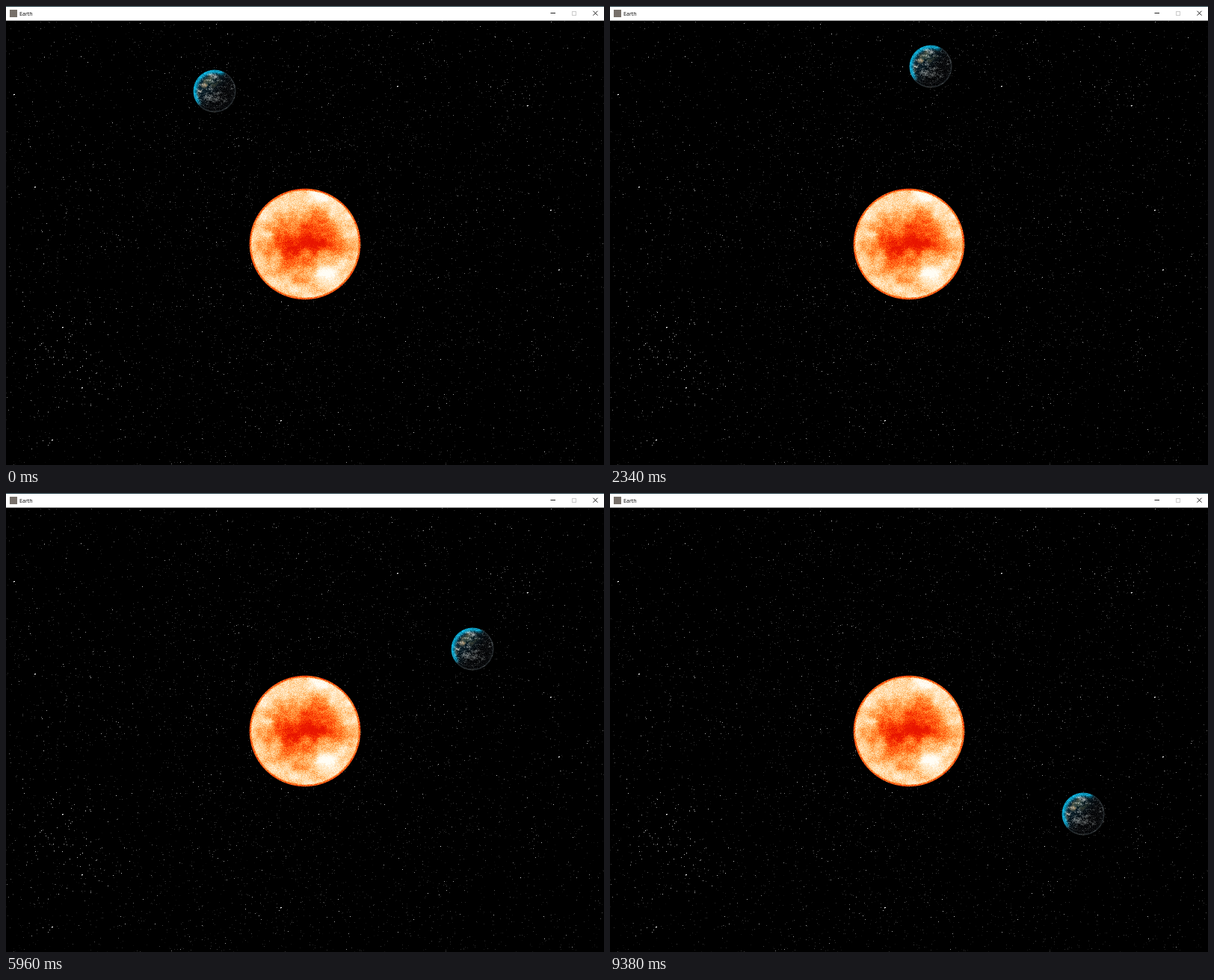
An HTML page with a canvas for the animation above (9400 ms loop, 800 px wide and 615 px high).

```html
<!DOCTYPE html>
<html lang="en">
<head>
<meta charset="utf-8">
<title>Earth</title>
<style>
  html, body { margin: 0; width: 100%; height: 100%; overflow: hidden; background: #000; }
  #stage { position: relative; width: 800px; height: 615px; overflow: hidden; background: #000; }
  canvas { position: absolute; left: 0; top: 0; }
  #bar { position: absolute; left: 0; top: 0; width: 800px; height: 20px; box-sizing: border-box;
         background: #fff; border-top: 1px solid #1c3640; border-bottom: 1px solid #999; }
  #icon { position: absolute; left: 5px; top: 4px; width: 10px; height: 10px; background: #77706a; }
  #name { position: absolute; left: 18px; top: 4px; font: 7.1px/10px "Open Sans", "Noto Sans", sans-serif; color: #000; }
  #bar svg { position: absolute; left: 0; top: -1px; }
</style>
</head>
<body>
<div id="stage">
  <canvas id="sky" width="800" height="615"></canvas>
  <canvas id="sun" width="152" height="152"></canvas>
  <canvas id="earth" width="60" height="60"></canvas>
  <div id="bar">
    <div id="icon"></div>
    <div id="name">Earth</div>
    <svg width="800" height="20" fill="none">
      <path d="M728.5 9.5h6.5" stroke="#222"/>
      <rect x="757.5" y="7.5" width="5" height="5" stroke="#ccc"/>
      <path d="M785.5 6.7l6 6m0-6l-6 6" stroke="#222"/>
    </svg>
  </div>
</div>
<script>
const LOOP = 9400, STEP = 20;
const ORBIT = { x: 405, y: 329.3, r: 249.4, from: -120.3, rate: 0.015354 };
const SUN = { x: 400, y: 319, r: 74.3 };
const EARTH_R = 28.4;

const el = id => document.getElementById(id);
const clamp = v => Math.max(0, Math.min(1, v));
const smooth = (a, b, v) => { const t = clamp((v - a) / (b - a)); return t * t * (3 - 2 * t); };
const mix = (a, b, t) => a + (b - a) * t;
const mixColor = (a, b, t) => a.map((v, i) => mix(v, b[i], t));

function hash(x, y, seed) {
  let h = Math.imul(x, 374761393) + Math.imul(y, 668265263) + Math.imul(seed, 974634777);
  h = Math.imul(h ^ (h >>> 13), 1274126177);
  h = Math.imul(h ^ (h >>> 16), 2246822519);
  return ((h ^ (h >>> 15)) >>> 0) / 4294967296;
}

function valueNoise(x, y, seed) {
  const i = Math.floor(x), j = Math.floor(y);
  const u = smooth(0, 1, x - i), v = smooth(0, 1, y - j);
  return mix(mix(hash(i, j, seed), hash(i + 1, j, seed), u),
             mix(hash(i, j + 1, seed), hash(i + 1, j + 1, seed), u), v);
}

// Layered noise around zero
function cloud(x, y, seed) {
  let sum = 0;
  for (let k = 0; k < 4; k++)
    sum += (valueNoise(x * 2 ** k, y * 2 ** k, seed + k) - 0.5) / 2 ** (k + 1);
  return sum;
}

// Soft ellipse with its peak of 1 at (cx, cy)
const glow = (x, y, cx, cy, rx, ry) => Math.exp(-(((x - cx) / rx) ** 2) - ((y - cy) / ry) ** 2);

// Shades a disc pixel by pixel; u and v run from -1 to 1 across it
function paintDisc(canvas, r, shade) {
  const g = canvas.getContext("2d"), n = canvas.width;
  const img = g.createImageData(n, n);
  for (let y = 0; y < n; y++) for (let x = 0; x < n; x++) {
    const u = (x + 0.5 - n / 2) / r, v = (y + 0.5 - n / 2) / r, d = Math.hypot(u, v);
    const cover = clamp((1 - d) * r + 0.5);
    if (cover) img.data.set([...shade(u, v, d, hash(x, y, 9) - 0.5), cover * 255], (y * n + x) * 4);
  }
  g.putImageData(img, 0, 0);
}

function paintSky() {
  const g = el("sky").getContext("2d");
  let count = 0;
  const rnd = () => hash(++count, 17, 5);
  const gauss = () => rnd() + rnd() + rnd() - 1.5;
  const star = (x, y, level, w = 1) => {
    g.fillStyle = `rgb(${level},${level},${level})`;
    g.fillRect(Math.round(x), Math.round(y), w, 1);
  };
  const scatter = (n, low, high) => {
    while (n--) star(rnd() * 800, 20 + rnd() * 595, mix(low, high, rnd() ** 2));
  };
  const cluster = (n, x, y, rx, ry, low, high) => {
    while (n--) star(x + gauss() * rx, y + gauss() * ry, mix(low, high, rnd()));
  };
  scatter(4500, 14, 74);
  scatter(650, 75, 200);
  scatter(35, 180, 240);
  cluster(3800, 400, 330, 420, 400, 16, 62);
  cluster(75, 85, 470, 65, 75, 70, 220);
  cluster(40, 685, 130, 35, 45, 50, 130);

  const bright = [[10, 118], [38, 242], [523, 107], [697, 133], [728, 273], [739, 353],
    [75, 430], [101, 511], [61, 581], [367, 555]];
  for (const [x, y] of bright) {
    star(x, y, 245, 2);
    star(x, y + 1, 120);
  }
}

function paintSun() {
  const heat = [[232, 20, 0], [255, 72, 6], [255, 138, 48], [255, 196, 126], [255, 232, 196], [255, 253, 245]];
  const heatAt = t => {
    const s = clamp(t) * (heat.length - 1), k = Math.min(Math.floor(s), heat.length - 2);
    return mixColor(heat[k], heat[k + 1], s - k);
  };
  paintDisc(el("sun"), SUN.r, (u, v, d, grain) => {
    const core = glow(u, v, 0.2, -0.18, 0.32, 0.26) + glow(u, v, -0.2, 0.08, 0.34, 0.34);
    const belt = glow(u, v, 0, 0, 1, 0.14);
    const flare = glow(u, v, 0.33, 0.52, 0.22, 0.1);
    const crown = glow(u, v, 0.38, -0.8, 0.3, 0.16);
    let t = 0.52 + 0.2 * smooth(0.5, 0.92, d) - 0.3 * core - 0.2 * belt + 0.45 * flare + 0.2 * crown;
    t += 0.62 * cloud(u * 6 + 20, v * 6 + 20, 20) + 0.26 * grain;
    return heatAt(mix(t, 0.25 + 0.4 * grain, smooth(0.95, 0.985, d)));
  });
  el("sun").style.transform = `translate(${SUN.x - 76}px, ${SUN.y - 76}px)`;
}

function paintEarth() {
  paintDisc(el("earth"), EARTH_R, (u, v, d, grain) => {
    const lit = smooth(-0.4, 0.9, -0.76 * u - 0.62 * v);
    const patch = cloud(u * 4 + 9, v * 4 + 9, 40), wisp = cloud(u * 6 + 30, v * 10 + 30, 60);
    const land = glow(u, v, -0.25, -0.45, 0.45, 0.3);
    const soil = mixColor([84, 104, 72], [226, 186, 134], clamp(0.3 - u + patch * 2));
    const bank = 0.75 * glow(u, v, -0.15, 0.3, 0.65, 0.3) + 0.6 * glow(u, v, 0, -0.72, 0.3, 0.14);
    const white = clamp(bank + 0.25 * lit + wisp * 2.4 + grain * 0.7 - 0.25);
    const rim = smooth(0.74, 0.94, d) * smooth(0.25, 0.65, lit);
    const haze = 0.3 * smooth(0.9, 1, d) * (1 - lit);
    let c = mixColor([9, 10, 12], [10, 40, 54], lit);
    c = mixColor(c, soil, clamp(land * 1.3 + patch * 2 - 0.35) * (0.4 + 0.6 * lit));
    c = mixColor(c, [205, 212, 210], white * (0.36 + 0.5 * lit));
    c = mixColor(c, [10, 172, 214], rim * (0.9 + grain * 0.4));
    return mixColor(c, [120, 136, 142], haze).map(k => k + grain * 24);
  });
}

function draw(now) {
  const t = Math.floor((now % LOOP) / STEP) * STEP;
  const a = (ORBIT.from + ORBIT.rate * t) * Math.PI / 180;
  const x = Math.round(ORBIT.x + ORBIT.r * Math.cos(a) - 30);
  const y = Math.round(ORBIT.y + ORBIT.r * Math.sin(a) - 30);
  el("earth").style.transform = `translate(${x}px, ${y}px)`;
}

paintSky();
paintSun();
paintEarth();
const start = performance.now();
function tick() {
  draw(performance.now() - start);
  requestAnimationFrame(tick);
}
tick();
</script>
</body>
</html>
```
